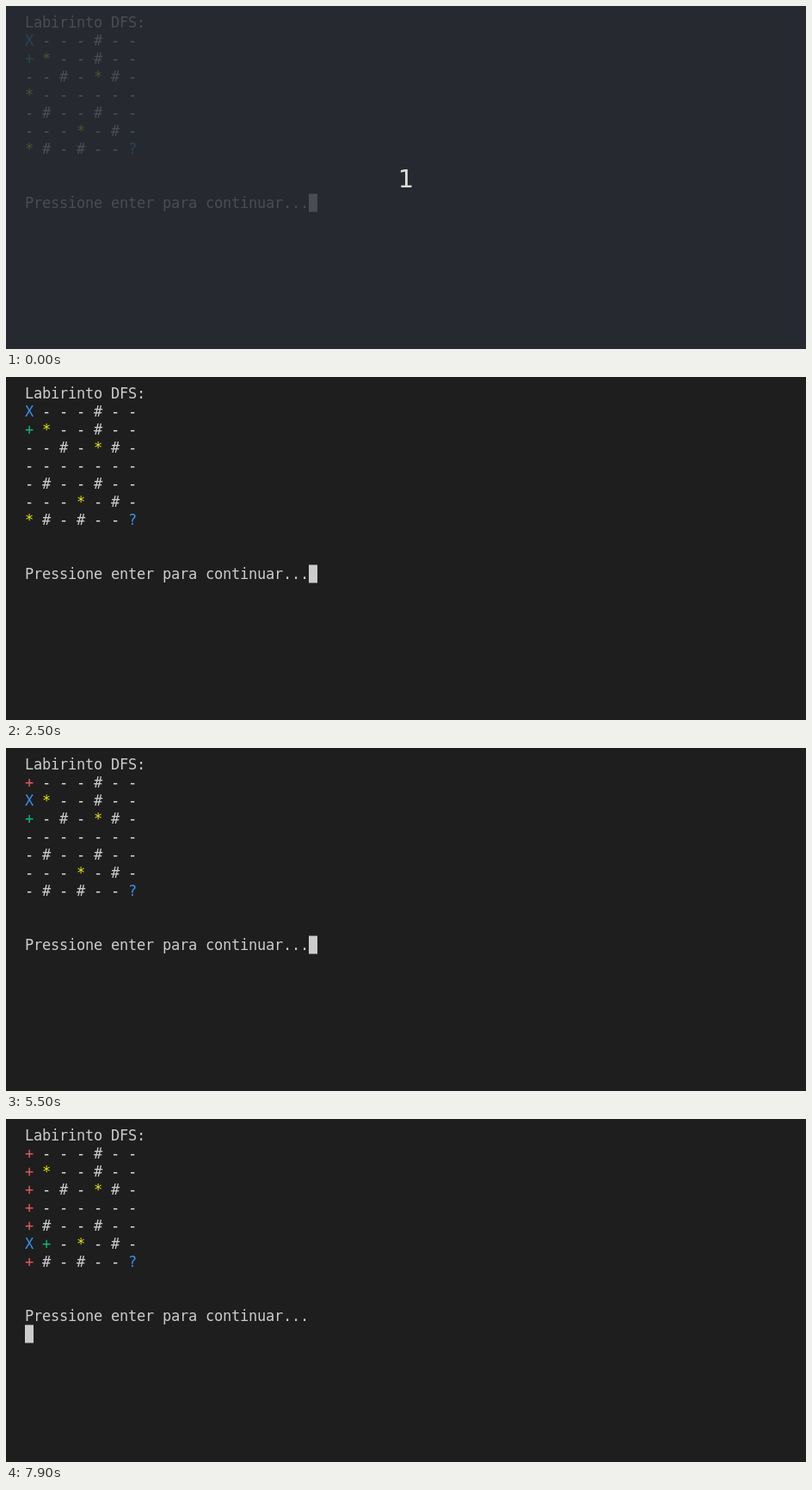
An HTML page with a canvas that plays this animation: 930 px wide and 399 px high, repeating every 8 s.

```html
<!DOCTYPE html>
<html lang="pt">
<head>
<meta charset="utf-8">
<title>Labirinto DFS</title>
<style>
  html, body { margin: 0; width: 100%; height: 100%; overflow: hidden; background: #1e1e1e; }
  canvas { display: block; }
</style>
</head>
<body>
<canvas id="stage" width="930" height="399"></canvas>
<script>
// An opaque canvas allows subpixel text smoothing
const ctx = document.getElementById('stage').getContext('2d', { alpha: false });
const LOOP = 8000, TICK = 100, LEFT = 22, CELL = 10, LINE = 21;
const TEXT = '#cccccc', RED = '#e65a60', GREEN = '#0dbc79', BLUE = '#3b8eea';
const COLORS = { '-': '#e5e5e5', '#': TEXT, '*': '#e5e510', '?': BLUE };
const MAZE = ['----#--', '-*--#--', '--#-*#-', '*------', '-#--#--', '---*-#-', '*#-#--?'];
const PROMPT = 'Pressione enter para continuar...';

// Moments at which enter is pressed; the maze is redrawn a little later
const PRESSES = [920, 1480, 1920, 2420, 2920, 3180, 3480, 3780, 4280, 4680,
  5080, 5420, 5780, 6180, 6480, 6880, 7180, 7420, 7880];
const REDRAW = 50;

// Depth-first search after a number of moves; a star sends the walker back to the start
function search(moves) {
  const grid = MAZE.map(line => [...line]);
  let path, seen, onStar;
  const here = () => path[path.length - 1];
  const restart = () => { path = [[0, 0]]; seen = new Set(['0,0']); onStar = false; };
  const next = () => {
    const [r, c] = here();
    return [[r + 1, c], [r, c + 1], [r - 1, c], [r, c - 1]].find(([y, x]) =>
      grid[y]?.[x] && grid[y][x] !== '#' && !seen.has(`${y},${x}`));
  };
  restart();
  while (moves--) {
    const cell = next();
    if (onStar) restart();
    else if (cell) {
      const [r, c] = cell;
      path.push(cell);
      seen.add(`${r},${c}`);
      onStar = grid[r][c] === '*';
      if (onStar) grid[r][c] = '-';
    } else path.pop();
  }
  return { grid, seen, here: here(), next: next() };
}

function put(text, col, line, color) {
  ctx.fillStyle = color;
  [...text].forEach((ch, i) => ctx.fillText(ch, LEFT + (col + i) * CELL, 25 + line * LINE));
}

function drawMaze(moves) {
  const walk = search(moves);
  walk.grid.forEach((line, r) => line.forEach((ch, c) => {
    const key = `${r},${c}`;
    const show = (mark, color) => put(mark, c * 2, r + 1, color);
    if (key === String(walk.here)) show('X', BLUE);
    else if (key === String(walk.next)) show('+', GREEN);
    else if (walk.seen.has(key)) show('+', RED);
    else show(ch, COLORS[ch]);
  }));
}

function drawCountdown() {
  ctx.fillStyle = 'rgba(41, 45, 53, 0.8)';
  ctx.fillRect(0, 0, 930, 399);
  ctx.font = '29px "DejaVu Sans", sans-serif';
  ctx.textAlign = 'center';
  ctx.fillStyle = '#dadfd4';
  ctx.fillText('1', 465, 211);
  ctx.textAlign = 'left';
}

function draw(time) {
  const t = Math.floor(time / TICK) * TICK;
  const pressed = PRESSES.filter(p => p <= t).length;
  const moves = PRESSES.filter(p => p + REDRAW <= t).length;
  const down = pressed > moves;
  ctx.fillStyle = '#1e1e1e';
  ctx.fillRect(0, 0, 930, 399);
  ctx.font = '17px "DejaVu Sans Mono", monospace';
  put('Labirinto DFS:', 0, 0, TEXT);
  drawMaze(moves);
  put(PROMPT, 0, 10, TEXT);
  ctx.fillStyle = TEXT;
  ctx.fillRect(LEFT + (down ? 0 : PROMPT.length * CELL), down ? 239.5 : 218.5, CELL, LINE);
  if (t < TICK) drawCountdown();
}

const start = performance.now();
function tick() {
  draw((performance.now() - start) % LOOP);
  requestAnimationFrame(tick);
}
tick();
</script>
</body>
</html>
```
